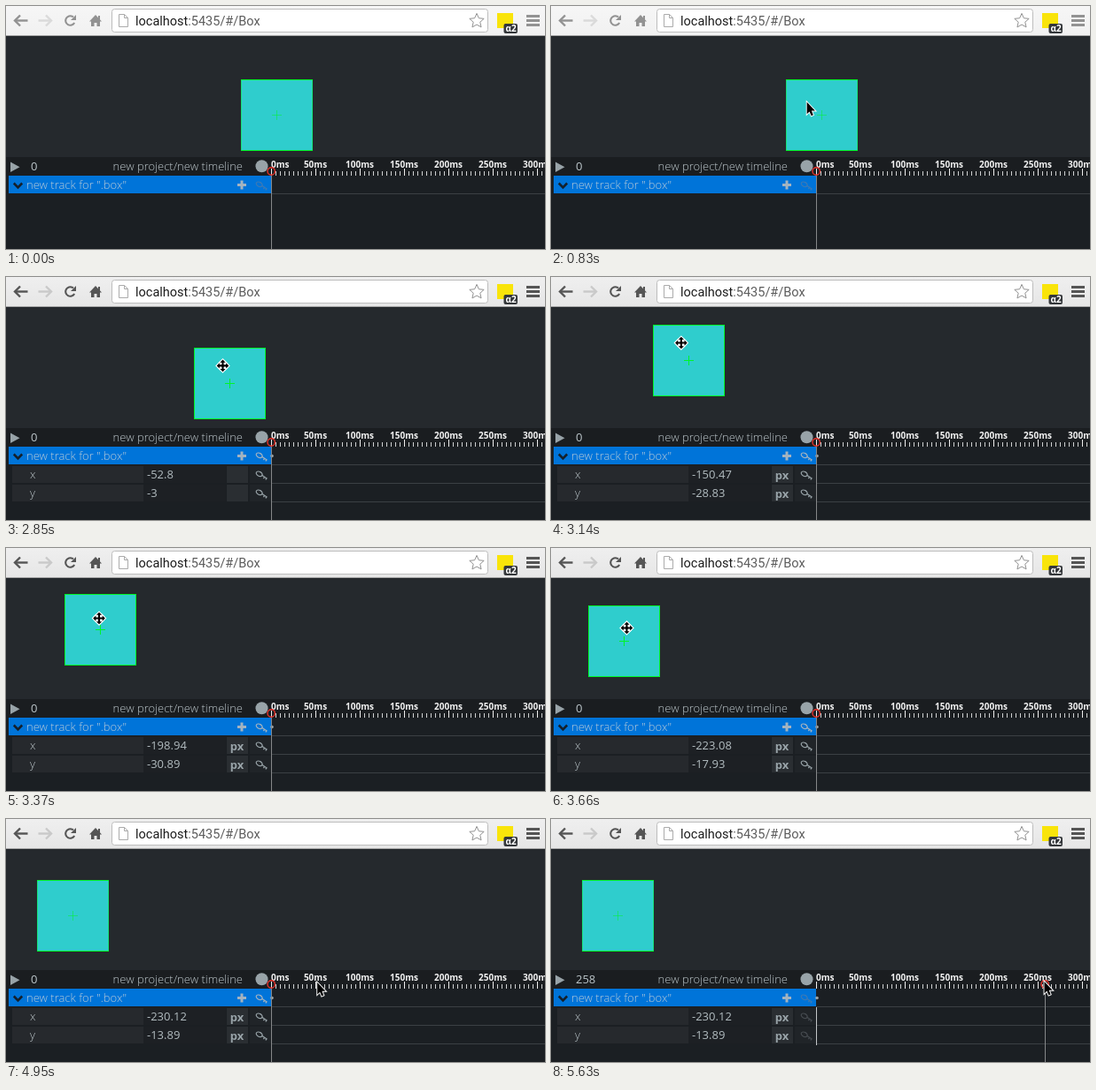
Recreate the animation shown at these times as an HTML page with a canvas. Size 608 by 275 pixels, loop 8000 ms.

```html
<!DOCTYPE html>
<html lang="en">
<head>
<meta charset="utf-8">
<title>Timeline editor</title>
<style>
html, body { margin: 0; width: 100%; height: 100%; overflow: hidden; background: #1b1f23; }
canvas { display: block; width: 608px; height: 275px; }
</style>
</head>
<body>
<canvas id="stage"></canvas>
<script>
const W = 608, H = 275, LOOP = 8000;
const canvas = document.getElementById('stage');
const ctx = canvas.getContext('2d');
const dpr = window.devicePixelRatio || 1;
canvas.width = W * dpr;
canvas.height = H * dpr;

const UI = '"Open Sans", sans-serif';
const LIGHT = '300 13px ' + UI;
const GREY = '#98a3a8', LABEL = '#bcc6ca', RULE = '#3b4044';
const ZERO = 299;           // x of 0 ms; one pixel per millisecond
const HOLD = [311, 107];    // where the pointer grabs the box

const mix = (a, b, k) => a + (b - a) * k;

// A stepped progress from 0 to 1; negative before it starts.
function progress(t, from, to, steps) {
  const n = steps - 1;
  return t < from ? -1 : Math.min(n, Math.floor((t - from) / (to - from) * n + 0.2)) / n;
}

// Box offset by drag step: [step, x, y]
const DRAG = [[0, 0, 0], [3, -52.8, -3], [9, -170, -34], [12, -198.94, -30.89], [13, -209, -26], [19, -230.12, -13.89]];

function offsetAt(step) {
  const i = Math.max(1, DRAG.findIndex(p => p[0] >= step));
  const [a, ax, ay] = DRAG[i - 1], [b, bx, by] = DRAG[i];
  const k = Math.max(0, (step - a) / (b - a));
  return [mix(ax, bx, k), mix(ay, by, k)];
}

function dragStep(t) {
  const drop = progress(t, 3490, 3770, 6);
  return drop >= 0 ? 14 + drop * 5 : progress(t, 2670, 3430, 14) * 13;
}

function pointerAt(t, step) {
  if (t >= 5580) return { pos: [556, 183] };
  let p = progress(t, 4720, 5520, 15);
  if (p >= 0) return { pos: [mix(269, 555, p), mix(149, 183, p) + 124 * p * (1 - p)] };
  p = progress(t, 4310, 4480, 4);
  if (p >= 0) return { pos: [mix(97, 266, p), mix(92, 144, p)], move: p === 0 };
  if (step >= 0) {
    // the pointer runs slightly ahead of the box
    const [x, y] = offsetAt(Math.min(19, step + 0.7));
    return { pos: [HOLD[0] + x, HOLD[1] + y], move: true };
  }
  p = progress(t, 1780, 2010, 5);
  if (p >= 0) return { pos: [mix(302, HOLD[0], p), mix(100, HOLD[1], p)], move: p >= 0.5 };
  p = progress(t, 500, 1120, 12);
  return p < 0 ? null : { pos: [mix(274, 300, p), mix(253, 98, 1 - (1 - p) ** 3.5)] };
}

function stateAt(t) {
  const step = dragStep(t);
  const [x, y] = offsetAt(step);
  return {
    x, y, step,
    focused: t >= 1420,
    dragging: step > 0 && t < 3770,
    time: t >= 5630 ? 258 : t >= 5580 ? 257 : 0,
    pointer: pointerAt(t, step)
  };
}

function rect(x, y, w, h, fill) {
  ctx.fillStyle = fill;
  ctx.fillRect(x, y, w, h);
}

function panel(x, y, w, h, r, fill, stroke) {
  ctx.beginPath();
  ctx.roundRect(x, y, w, h, r);
  ctx.fillStyle = fill;
  ctx.fill();
  if (!stroke) return;
  ctx.strokeStyle = stroke;
  ctx.lineWidth = 1;
  ctx.stroke();
}

function text(str, x, y, font, fill, align = 'left') {
  ctx.font = font;
  ctx.fillStyle = fill;
  ctx.textAlign = align;
  ctx.fillText(str, x, y);
}

function trace(pts, close) {
  ctx.beginPath();
  for (const [x, y] of pts) ctx.lineTo(x, y);
  if (close) ctx.closePath();
}

function line(pts, color, width = 1, close = false) {
  trace(pts, close);
  ctx.strokeStyle = color;
  ctx.lineWidth = width;
  ctx.stroke();
}

function shape(pts, fill) {
  trace(pts, true);
  ctx.fillStyle = fill;
  ctx.fill();
}

function disc(x, y, r, fill) {
  ctx.beginPath();
  ctx.arc(x, y, r, 0, 7);
  ctx.fillStyle = fill;
  ctx.fill();
}

function ring(x, y, rx, ry, color, width, a = 0, b = 2 * Math.PI, tilt = 0) {
  ctx.beginPath();
  ctx.ellipse(x, y, rx, ry, tilt, a, b);
  ctx.strokeStyle = color;
  ctx.lineWidth = width;
  ctx.stroke();
}

function at(x, y, draw, sx = 1, sy = 1) {
  ctx.save();
  ctx.translate(x, y);
  ctx.scale(sx, sy);
  draw();
  ctx.restore();
}

function navArrow(color) {
  line([[-7, 0], [7.5, 0]], color, 2.4);
  line([[-1, -6], [-7, 0], [-1, 6]], color, 2.4);
}

function drawHome(color) {
  shape([[0, -7], [7, 0.5], [-7, 0.5]], color);
  rect(3, -6, 2, 5, color);
  for (const x of [-5, 1.5]) rect(x, 0, 3.5, 6, color);
  rect(-5, 0, 10, 2, color);
}

function drawToolbar(focused) {
  const icon = focused ? '#555' : '#929292';
  const g = ctx.createLinearGradient(0, 0, 0, 33);
  g.addColorStop(0, focused ? '#efefef' : '#f6f6f6');
  g.addColorStop(1, focused ? '#e6e6e6' : '#f1f1f1');
  rect(0, 0, W, 33, g);
  rect(0, 33, W, 1, '#a6a6a6');

  at(17, 16.5, () => navArrow(icon));
  at(44, 16.5, () => navArrow(focused ? '#c9c9c9' : '#dadada'), -1);
  ring(72.5, 16.5, 5.3, 5.3, icon, 2.1, 0.5, 5.4);
  shape([[79, 10], [79, 16], [73, 16]], icon);
  at(101, 17, () => drawHome(icon));

  panel(119.5, 3.5, 424, 26, 3, '#fff', '#bdbdbd');
  line([[127.5, 9.5], [133.5, 9.5], [137.5, 13.5], [137.5, 23.5], [127.5, 23.5]], '#ababab', 1, true);
  line([[133.5, 9.5], [133.5, 13.5], [137.5, 13.5]], '#ababab');

  const font = '14.5px Roboto, sans-serif';
  text('localhost', 146, 21.5, font, '#1c1c1c');
  text(':5435/#/Box', 146 + ctx.measureText('localhost').width, 21.5, font, '#5c5c5c');

  const star = Array.from({ length: 10 }, (_, i) => {
    const r = i % 2 ? 4 : 8.6, a = i * Math.PI / 5 - Math.PI / 2;
    return [531 + r * Math.cos(a), 17 + r * Math.sin(a)];
  });
  line(star, '#929292', 1, true);

  rect(554, 8, 18, 17, '#f9e40a');
  panel(561.5, 20, 15.5, 11, 2, '#34373a');
  text('α2', 569.5, 29, '700 10px ' + UI, '#fff', 'center');
  for (let i = 0; i < 3; i++) rect(587, 10 + 5 * i, 15, 3, icon);
}

function drawBox({ x, y, dragging }) {
  const l = Math.round(265 + x), u = Math.floor(83.4 + y), size = 81;
  const green = '#00f528';
  rect(l, u, size, size, '#2fcdcd');
  ctx.globalAlpha = dragging ? 1 : 0.5;
  for (const dx of [0, size - 1]) rect(l + dx, u, 1, size, green);
  rect(l + 40, u + 35, 1, 11, green);
  rect(l + 35, u + 40, 11, 1, green);
  ctx.globalAlpha = 1;
  for (const dy of [0, size - 1]) rect(l, u + dy, size, 1, green);
}

function drawKey(y, color) {
  at(288, y, () => {
    ring(-2.3, -1.2, 3.7, 2.5, color, 1.2, 0, 2 * Math.PI, 0.5);
    line([[0.6, 0.3], [6, 3.8], [4.8, 5.4]], color, 1.3);
    line([[3.6, 2.4], [2.4, 4]], color, 1.3);
  });
}

function drawRow(label, value, y, hasUnit, keyColor) {
  rect(7, y, 148, 19, '#26292d');
  rect(155, y, 93, 19, '#1d2024');
  rect(249, y, 24, 19, '#2a2e32');
  rect(275, y, 24, 19, '#202428');
  text(label, 27, y + 14, LIGHT, LABEL);
  text(String(+value.toFixed(2)), 159, y + 14, '13px ' + UI, '#b3bdc1');
  if (hasUnit) text('px', 260.5, y + 15, '700 13px ' + UI, GREY, 'center');
  drawKey(y + 10, keyColor);
  rect(ZERO, y + 19, W - ZERO, 1, RULE);
}

function drawRuler() {
  for (let ms = 0; ms <= 305; ms += 5) {
    const major = ms % 50 === 0;
    rect(ZERO + ms, major ? 184 : 187, 1, major ? 8 : 5, major ? '#f0f0f0' : '#cfd1d2');
    if (major) text(ms + 'ms', ZERO + ms, 183, '700 10px ' + UI, '#f2f2f2', ms ? 'center' : 'left');
  }
}

function drawTimeline(s) {
  const open = s.step >= 1, moved = s.time > 0;
  rect(0, 171, W, H - 171, '#1b1f23');
  rect(0, 171, W, 21, '#1a1d20');

  shape([[5, 176.5], [15.5, 182.3], [5, 188]], GREY);
  text(s.time, 28, 186, '13px ' + UI, LABEL);
  text('new project/new timeline', 267, 186, LIGHT, LABEL, 'right');
  disc(288.5, 181.3, 7, GREY);
  drawRuler();

  rect(3, 192, 296, 20, '#0074d9');
  line([[8.8, 200.5], [13.5, 205.3], [18.2, 200.5]], '#14202c', 2.6);
  text('new track for ".box"', 23, 207, LIGHT, '#b9cad8');
  rect(261, 201, 10, 3, '#a3b3c0');
  rect(264.5, 197.5, 3, 10, '#a3b3c0');
  drawKey(203, open && !moved ? '#a5b4c0' : '#3d7ab4');
  rect(ZERO, 212, W - ZERO, 1, RULE);

  if (open) {
    const key = moved ? '#464b50' : GREY;
    drawRow('x', s.x, 214, s.step > 3, key);
    drawRow('y', s.y, 235, s.step > 3, key);
    if (moved) rect(ZERO, 213, 1, 43, '#c4c7c9');
    disc(300, 202.5, 1.8, GREY);
  }

  const px = ZERO + s.time;
  rect(px, 191, 1, H - 191, '#858789');
  ring(px + 0.2, 187, 4.2, 4.2, '#e8342c', 1.4);
}

function drawArrow() {
  const pts = [[0, 0], [0, 15], [3.4, 11.8], [5.8, 17.2], [8.4, 16.1], [6.1, 10.8], [10.8, 10.8]];
  line(pts, '#fff', 2.2, true);
  shape(pts, '#000');
}

function drawMove() {
  const arm = [[-1.1, 1], [-1.1, -4], [-3.4, -4], [0, -7.4], [3.4, -4], [1.1, -4], [1.1, 1]];
  const paint = [() => line(arm, '#fff', 2.4, true), () => shape(arm, '#000')];
  for (const draw of paint) {
    for (let i = 0; i < 4; i++) {
      draw();
      ctx.rotate(Math.PI / 2);
    }
  }
}

function render(t) {
  const s = stateAt(t);
  ctx.setTransform(dpr, 0, 0, dpr, 0, 0);
  rect(0, 0, W, H, '#25292d');
  drawToolbar(s.focused);
  drawBox(s);
  drawTimeline(s);
  if (!s.pointer) return;
  const { pos: [x, y], move } = s.pointer;
  if (move) at(x, y, drawMove, 0.92, 0.92);
  else at(x + 0.5, y + 1, drawArrow, 0.85, 0.9);
}

const start = performance.now();
function loop() {
  render((performance.now() - start) % LOOP);
  requestAnimationFrame(loop);
}
loop();
</script>
</body>
</html>
```
